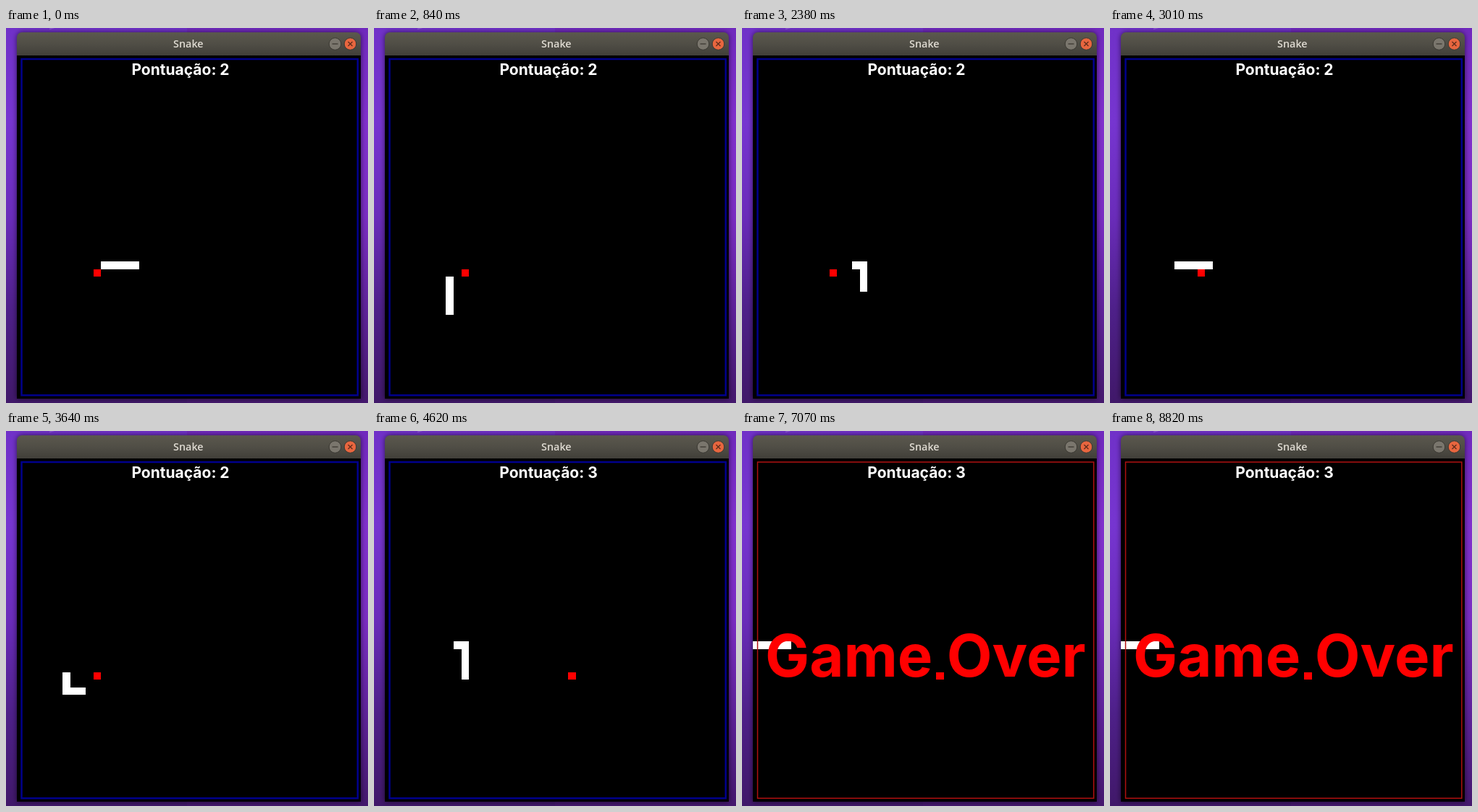
An HTML page with a canvas for the animation above (9.73 s loop, 500 by 519 pixels).

```html
<!DOCTYPE html>
<html lang="pt">
<head>
<meta charset="utf-8">
<title>Snake</title>
<style>
  html, body { margin: 0; width: 100%; height: 100%; overflow: hidden; background: #4a1a7c; }
  canvas { display: block; }
</style>
</head>
<body>
<canvas id="stage" width="500" height="519"></canvas>
<script>
const ctx = document.getElementById('stage').getContext('2d');
const LOOP = 9730, STEP = 70, GAME_OVER = 5740;
const LEFT = 15, TOP = 38, SIZE = 475, CELL = SIZE / 45;
const SANS = 'Inter, "Liberation Sans", sans-serif';

// Time steps at which the snake rests instead of advancing
const rests = [3, 6, 9, 13, 16, 20, 23, 27, 30, 33, 36, 39, 42, 45, 48, 51,
               54, 57, 60, 63, 65, 69, 71, 75, 78];
const route = 'L3 D7 R6 U7 L8 D3 R4 U6 L11';
const dirs = { L: [-1, 0], R: [1, 0], U: [0, -1], D: [0, 1] };

// Every cell the head visits, beginning with the starting body
const START = 5, EATEN = 40;
const trail = [15, 14, 13, 12, 11].map(x => [x, 27]);
for (const leg of route.split(' ')) {
  const [dx, dy] = dirs[leg[0]];
  for (let n = +leg.slice(1); n > 0; n--) {
    const [x, y] = trail[trail.length - 1];
    trail.push([x + dx, y + dy]);
  }
}
const MOVES = trail.length - START;

function movesAt(t) {
  const step = Math.floor(t / STEP);
  return Math.min(MOVES, step - rests.filter(r => r <= step).length);
}

function gradient(y0, y1, ...colors) {
  const g = ctx.createLinearGradient(0, y0, 0, y1);
  colors.forEach((c, i) => g.addColorStop(i / (colors.length - 1), c));
  return g;
}

function box(x, y, w, h, fill) {
  ctx.fillStyle = fill;
  ctx.fillRect(x, y, w, h);
}

function cell([x, y], fill) {
  const px = Math.round(LEFT + x * CELL), py = Math.round(TOP + y * CELL);
  box(px, py, Math.round(LEFT + (x + 1) * CELL) - px,
      Math.round(TOP + (y + 1) * CELL) - py, fill);
}

function text(str, x, y, font, fill) {
  ctx.font = font;
  ctx.fillStyle = fill;
  ctx.textAlign = 'center';
  ctx.fillText(str, x, y);
}

function lines(points, color, width) {
  ctx.strokeStyle = color;
  ctx.lineWidth = width;
  ctx.beginPath();
  for (const [x0, y0, x1, y1] of points) {
    ctx.moveTo(x0, y0);
    ctx.lineTo(x1, y1);
  }
  ctx.stroke();
}

function button(x, fill, glyphColor, glyph) {
  ctx.beginPath();
  ctx.arc(x, 22, 8.3, 0, 7);
  ctx.fillStyle = fill;
  ctx.fill();
  ctx.strokeStyle = '#3b3933';
  ctx.lineWidth = 1;
  ctx.stroke();
  lines(glyph.map(([a, b, c, d]) => [x + a, 22 + b, x + c, 22 + d]), glyphColor, 1.3);
}

function desktop() {
  box(0, 0, 250, 519, gradient(0, 519, '#7031c8', '#7635d0', '#6a2cba', '#4e2089', '#401869'));
  box(250, 0, 250, 519, gradient(0, 519, '#7029bd', '#8030cc', '#7a2dc2', '#5e2299', '#44186d'));
  lines([[60, 1.5, 68, -1]], '#8a52d2', 1.5);
}

function windowFrame() {
  ctx.save();
  ctx.shadowColor = 'rgba(0, 0, 0, 0.6)';
  ctx.shadowBlur = 7;
  ctx.beginPath();
  ctx.roundRect(LEFT, 6, SIZE, TOP + SIZE - 6, [7, 7, 0, 0]);
  ctx.fillStyle = gradient(6, TOP, '#5b584e', '#504e46', '#413f39');
  ctx.fill();
  ctx.restore();
  text('Snake', 251.8, 27, '600 14.4px "Open Sans", "Noto Sans", sans-serif', '#dfdbd2');
  button(454.5, '#7a766d', '#3b3832', [[-4, 0, 4, 0]]);
  button(475.5, '#e8663f', '#5e2c1c', [[-3, -3, 3, 3], [3, -3, -3, 3]]);
  box(LEFT, TOP, SIZE, SIZE, '#000');
}

function draw(t) {
  const moves = movesAt(t), over = t >= GAME_OVER, ate = moves >= EATEN;
  const end = START + moves;
  desktop();
  windowFrame();

  ctx.save();
  ctx.beginPath();
  ctx.rect(LEFT, TOP, SIZE, SIZE);
  ctx.clip();
  trail.slice(end - START - (ate ? 1 : 0), end).forEach(c => cell(c, '#fff'));
  cell([ate ? 24 : 10, 28], '#f00');
  ctx.strokeStyle = over ? '#b01010' : '#00008c';
  ctx.lineWidth = over ? 1.5 : 2.5;
  ctx.strokeRect(21.5, 43, 464.3, 465.3);
  text('Pontuação: ' + (ate ? 3 : 2), 241, 65, `bold 21px ${SANS}`, '#fff');
  if (over) text('Game Over', 253.3, 339.5, `bold 81.5px ${SANS}`, '#f00');
  ctx.restore();
}

const begin = performance.now();
function tick() {
  draw((performance.now() - begin) % LOOP);
  requestAnimationFrame(tick);
}
tick();
</script>
</body>
</html>
```
